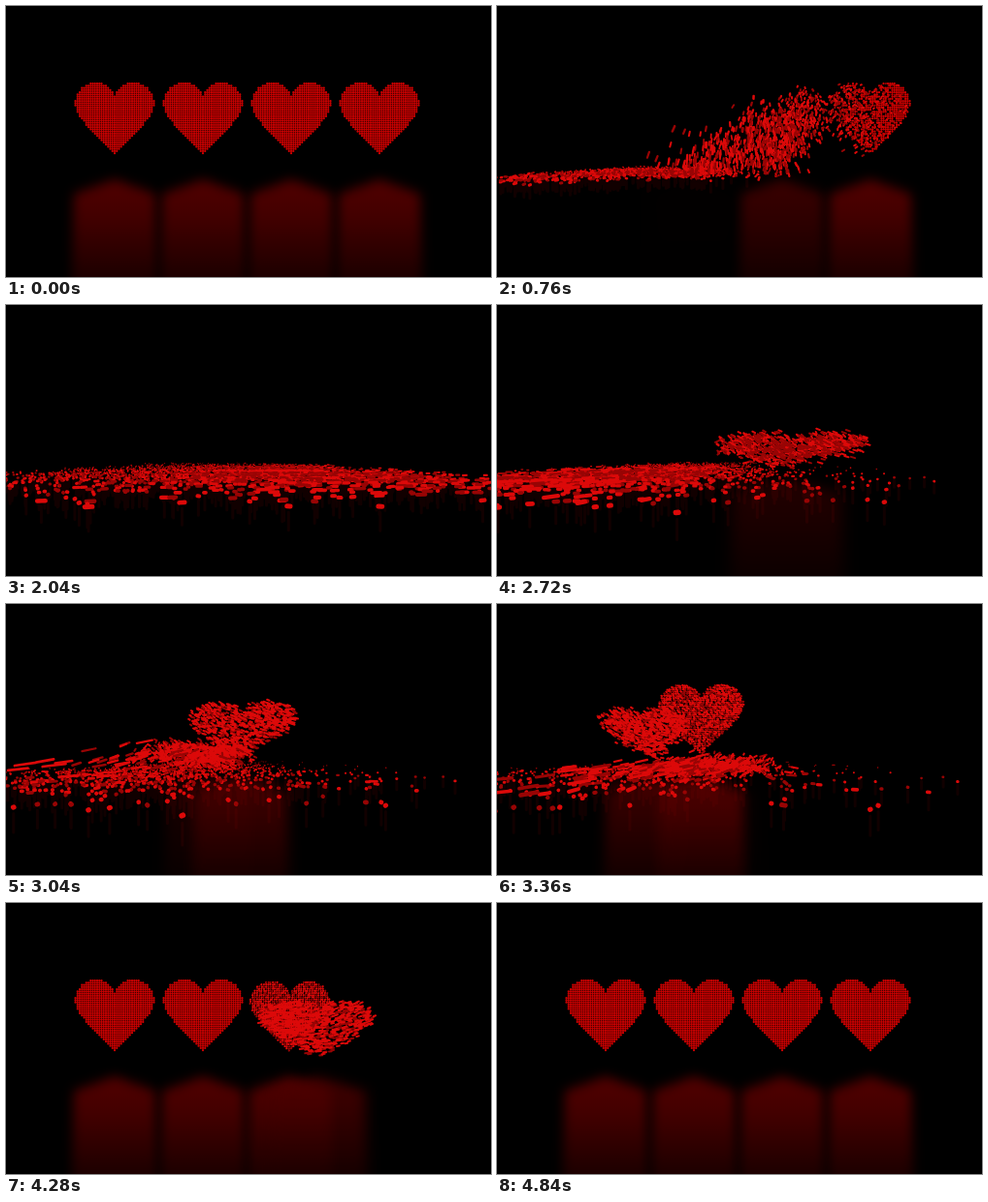
An HTML page with a canvas for the animation above (5840 ms loop, 500x280 px).

```html
<!DOCTYPE html>
<html lang="en">
<head>
<meta charset="utf-8">
<title>Four hearts</title>
<style>
  html, body { margin: 0; width: 100%; height: 100%; overflow: hidden; background: #000; }
  canvas { display: block; width: 500px; height: 280px; }
</style>
</head>
<body>
<canvas id="stage" width="500" height="280"></canvas>
<script>
const W = 500, H = 280, LOOP = 5840, STEP = 40, SHUTTER = 7;
const MID = 250, HORIZON = 158, FLOOR = 16;   // FLOOR: drop below the horizon at the hearts' depth
const TIP = 153, PITCH = 2.25, RISE = 1150, GRAVITY = 900;
const TIP_HEIGHT = HORIZON + FLOOR - TIP;
const ctx = document.getElementById('stage').getContext('2d');

// base, widen and shear shape each heart while it rises; drift slides its beads beforehand
const hearts = [
  { cx: 112, start: 2850, base: 160,  widen: 0.1, shear: -0.6, drift: 10 },
  { cx: 203, start: 2450, base: 150,  widen: 1.4, shear: 0.4,  drift: -50 },
  { cx: 294, start: 3290, base: -115, widen: 0.2, shear: 0.9,  drift: 120 },
  { cx: 385, start: 3690, base: -270, widen: 1.8, shear: 0,    drift: 230 }
];

let seed = 20177;
function rand() {
  seed = (seed * 1664525 + 1013904223) % 4294967296;
  return seed / 4294967296;
}
const gauss = () => (rand() + rand() + rand() - 1.5) * 2;
const clamp = v => Math.min(1, Math.max(0, v));
const mix = (a, b, k) => a + (b - a) * k;
const smooth = v => { v = clamp(v); return v * v * (3 - 2 * v); };

// h is the height above the tip
function inHeart(x, h) {
  x = Math.abs(x);
  if (h < 37.8) return x <= h * 0.933 + 2.2 * Math.sin(Math.PI * h / 37.8);
  return Math.hypot(x - 19.5, h - 52.5) <= 21.3 || (x < 19.5 && h < 52.5);
}

const dropTime = x => 40 + 900 * clamp((x - 70) / 356);

const beads = [];
for (const heart of hearts) {
  for (let h = 0.8; h < 75; h += PITCH) {
    for (let i = -18; i <= 18; i++) {
      const lx = i * PITCH;
      if (!inHeart(lx, h)) continue;
      beads.push({
        heart, lx, h,
        drop: 40 + (dropTime(heart.cx + lx) - 40) * (0.78 + 0.22 * rand()),
        vx: gauss() * 40 - 8,
        vs: gauss() * 0.33,
        bounce: rand() * 9,
        drift: heart.drift * (rand() < 0.05 ? 0.2 : 0.8 + 0.4 * rand()),
        lift: heart.start - 400 + 280 * rand(),
        nx: gauss() * 12, ny: gauss() * 6,
        shade: rand() < 0.4 ? 1 : 0
      });
    }
  }
}

function riseOf(heart, t) {
  const left = 1 - clamp((t - heart.start) / RISE);
  return 1 - left * left;
}

// Falling, then scattering over the floor
function scattered(b, t) {
  const age = Math.max(0, t - b.drop) / 1000;
  const spread = 2.2 * (1 - Math.exp(-age / 1.8));
  const s = Math.exp(b.vs * spread);
  const height = TIP_HEIGHT + b.h;
  const after = age - Math.sqrt(2 * height / GRAVITY);
  const y = after < 0
    ? height - GRAVITY * age * age / 2
    : b.bounce * Math.exp(-4 * after) * Math.abs(Math.sin(9 * after));
  const x = b.heart.cx + b.lx - MID + b.vx * spread - b.drift * smooth((t - 1800) / 1000);
  return { x: MID + x * s, y: HORIZON + (FLOOR - y) * s, s, floor: after > 0 };
}

// Place inside the leaning heart that stands up from the floor
function rising(b, t) {
  const a = b.heart, e = riseOf(a, t), r = 1 - e;
  return {
    x: a.cx + a.base * r + b.lx * (1 + a.widen * r) + a.shear * b.h * r + b.nx * r,
    y: TIP + 20 * r - b.h * e + b.ny * r
  };
}

function place(b, t) {
  if (t <= b.drop || t >= b.heart.start + RISE) {
    return { x: b.heart.cx + b.lx, y: TIP - b.h, s: 1, home: true };
  }
  const from = scattered(b, t);
  const q = smooth((t - b.lift) / 500);
  if (q === 0) return from;
  const to = rising(b, t);
  return {
    x: mix(from.x, to.x, q),
    y: mix(from.y, to.y, q),
    s: mix(from.s, 1, q),
    floor: q < 0.3
  };
}

// Soft mirror image shared by all hearts
const glow = document.createElement('canvas');
glow.width = 130;
glow.height = 130;
{
  const g = glow.getContext('2d');
  const fade = g.createLinearGradient(0, 30, 0, 130);
  fade.addColorStop(0, '#500000');
  fade.addColorStop(0.35, '#430000');
  fade.addColorStop(1, '#1c0000');
  g.filter = 'blur(6px)';
  g.fillStyle = fade;
  g.beginPath();
  g.moveTo(65, 27);
  g.lineTo(107, 42);
  g.lineTo(110, 160);
  g.lineTo(20, 160);
  g.lineTo(23, 42);
  g.fill();
}

function drawGlow(t) {
  ctx.globalCompositeOperation = 'lighten';
  for (const a of hearts) {
    const e = riseOf(a, t), r = 1 - e;
    const back = t >= a.start;
    ctx.globalAlpha = back ? e : 1 - smooth((t - dropTime(a.cx)) / 420);
    const shift = back ? (a.base + a.shear * 35) * r : 0;
    const wide = back ? 1 + a.widen * r * 0.4 : 1;
    ctx.drawImage(glow, a.cx + shift - 65 * wide, 152, 130 * wide, 130);
  }
  ctx.globalAlpha = 1;
  ctx.globalCompositeOperation = 'source-over';
}

const COLORS = ['#dc0909', '#980404', '#cb0000'];

function draw(t) {
  ctx.fillStyle = '#000';
  ctx.fillRect(0, 0, W, H);
  drawGlow(t);

  const groups = new Map();
  const sheen = new Path2D();
  for (const b of beads) {
    const p = place(b, t);
    if (p.x < -30 || p.x > W + 30 || p.y > H + 20) continue;
    let a = p, z = p;
    if (!p.home) {
      a = place(b, t - SHUTTER);
      z = place(b, t + SHUTTER);
    }
    const width = Math.round((p.home ? 2.2 : 2 * Math.pow(p.s, 0.8)) * 4) / 4;
    const shade = p.home ? 2 : b.shade;
    const key = width * 10 + shade;
    if (!groups.has(key)) {
      groups.set(key, { width, color: COLORS[shade], path: new Path2D() });
    }
    const { path } = groups.get(key);
    path.moveTo(a.x, a.y);
    path.lineTo(z.x + 0.01, z.y);
    if (p.floor && p.s > 1.2) {
      sheen.moveTo(p.x, p.y + 2 * p.s);
      sheen.lineTo(p.x, p.y + 8 * p.s);
    }
  }

  ctx.lineCap = 'round';
  ctx.lineWidth = 3;
  ctx.strokeStyle = 'rgba(130, 0, 0, 0.13)';
  ctx.stroke(sheen);
  for (const g of [...groups.values()].sort((m, n) => m.width - n.width)) {
    ctx.lineWidth = g.width;
    ctx.strokeStyle = g.color;
    ctx.stroke(g.path);
  }
}

const origin = performance.now();
let last = -1;
function tick() {
  const t = Math.floor((performance.now() - origin) % LOOP / STEP) * STEP;
  if (t !== last) draw(last = t);
  requestAnimationFrame(tick);
}
tick();
</script>
</body>
</html>
```
